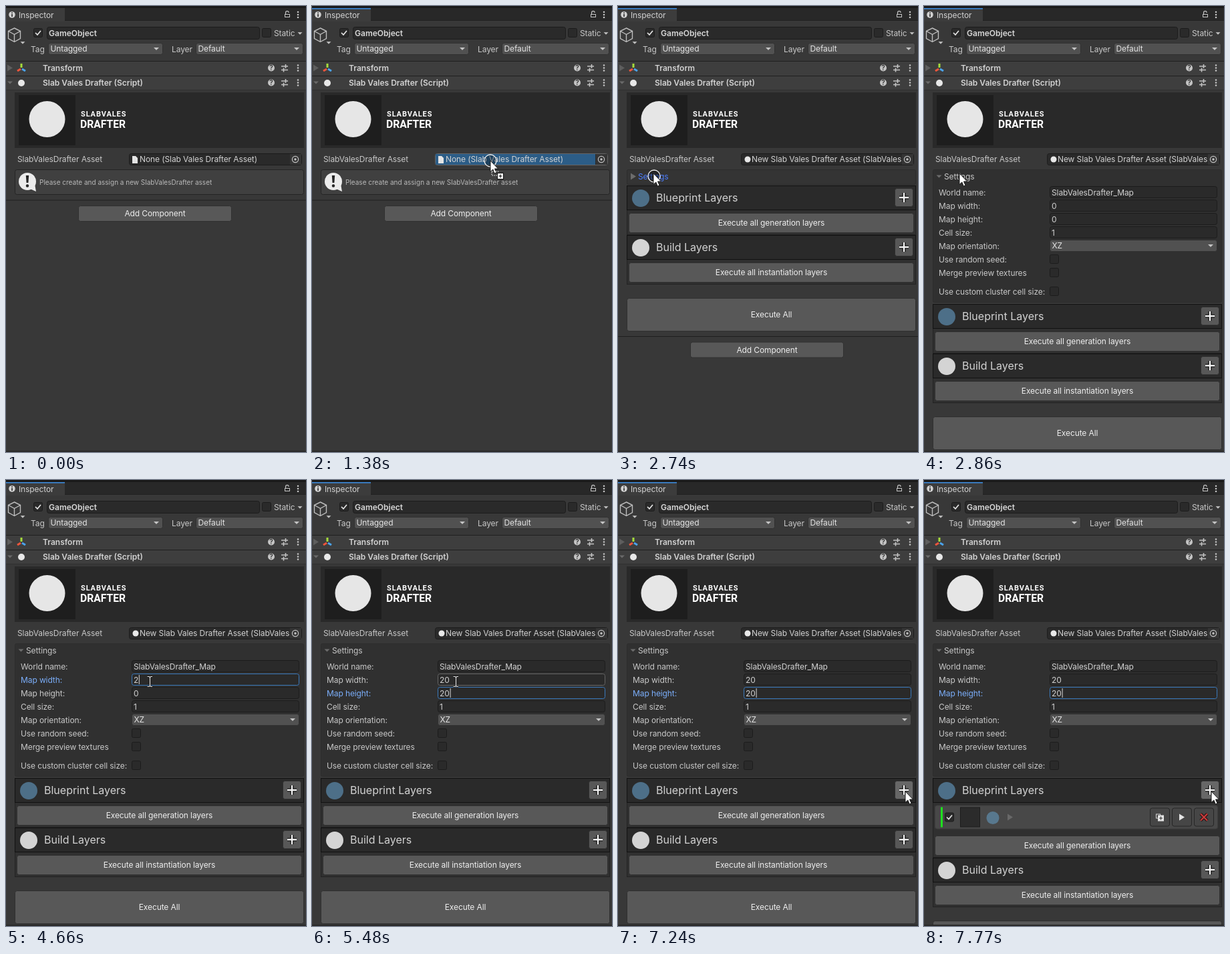
These frames come from a looping animation (449x666 px, 8 s). An HTML page:

```html
<!DOCTYPE html>
<html lang="en">
<head>
<meta charset="utf-8">
<title>Inspector</title>
<style>
html, body { margin: 0; width: 100%; height: 100%; overflow: hidden; background: #383838; }
svg { display: block; }
text { font: 12px Inter, "Open Sans", sans-serif; letter-spacing: -.1px; white-space: pre; }
.bold { font-weight: 600; letter-spacing: 0; }
.big { font-size: 16px; letter-spacing: 0; }
.small { font-size: 10px; letter-spacing: 0; }
.mid { text-anchor: middle; }
.mark1 { font: bold 11px Roboto, sans-serif; letter-spacing: .9px; }
.mark2 { font: bold 15.7px Roboto, sans-serif; letter-spacing: 0; }
</style>
</head>
<body>
<svg id="stage" width="449" height="666" viewBox="0 0 449 666"></svg>
<script>
const LOOP = 8000;
const stage = document.getElementById('stage');

// time, x, y, kind: arrow, drag (no drop), drop (plus badge), beam
const moves = [
  [960, 230, 207, 'drag'], [1110, 255, 226, 'drop'], [1240, 267, 231, 'drop'],
  [1930, 267, 231, 'arrow'], [2210, 162, 239, 'arrow'], [2350, 118, 246, 'arrow'],
  [2480, 72, 249, 'arrow'], [2590, 53, 250, 'arrow'], [3290, 93, 272, 'arrow'],
  [3440, 150, 296, 'arrow'], [3560, 196, 317, 'beam'], [3680, 212, 311, 'beam'],
  [3980, 215, 301, 'beam'], [6000, 226, 290, 'beam'], [6130, 240, 251, 'arrow'],
  [6250, 247, 279, 'beam'], [6400, 251, 385, 'arrow'], [6530, 254, 461, 'arrow'],
  [6680, 272, 478, 'arrow'], [6810, 299, 490, 'arrow'], [6960, 362, 499, 'arrow'],
  [7090, 422, 488, 'arrow'], [7240, 430, 465, 'arrow']
];
let mouse;

const path = (d, fill, stroke = 'none', w = 1) =>
  `<path d="${d}" fill="${fill}" stroke="${stroke}" stroke-width="${w}"/>`;
const box = (x, y, w, h, fill, stroke, r = 0) => stroke
  ? `<rect x="${x + .5}" y="${y + .5}" width="${w - 1}" height="${h - 1}" rx="${r}" fill="${fill}" stroke="${stroke}"/>`
  : `<rect x="${x}" y="${y}" width="${w}" height="${h}" rx="${r}" fill="${fill}"/>`;
const disc = (x, y, r, fill, stroke = 'none', w = 1) =>
  `<circle cx="${x}" cy="${y}" r="${r}" fill="${fill}" stroke="${stroke}" stroke-width="${w}"/>`;
const text = (x, y, s, cls = '', fill = '#c8c8c8') =>
  `<text x="${x}" y="${y}" class="${cls}" fill="${fill}">${s}</text>`;

const over = (x, y, w, h) => mouse && mouse[1] >= x && mouse[1] < x + w && mouse[2] >= y && mouse[2] < y + h;
const button = (x, y, w, h, label = '') =>
  box(x, y, w, h, over(x, y, w, h) ? '#676767' : '#585858', '#303030', 3) +
  text(x + w / 2, y + h / 2 + 4.4, label, 'mid', '#eee');
const field = (x, y, w, h, focus) =>
  box(x, y, w, h, '#2a2a2a', focus ? '#3a79bb' : over(x, y, w, h) ? '#656565' : '#1c1c1c', 3);
const check = (x, y, on) => box(x, y, 14, 14, '#2a2a2a', '#1c1c1c', 2) +
  (on ? path(`M${x + 3} ${y + 7}l3 3l5-6`, 'none', '#e4e4e4', 1.7) : '');
const right = (x, y, fill) => path(`M${x} ${y - 5}l8 5l-8 5z`, fill);
const down = (x, y, fill = '#c4c4c4', s = 4) => path(`M${x - s} ${y - s / 2}h${2 * s}l${-s} ${s}z`, fill);
const dropdown = (x, y, w, label) =>
  box(x, y, w, 18, '#515151', '#303030', 3) + text(x + 3.5, y + 13, label, '', '#e4e4e4') + down(x + w - 10, y + 9);
const dots = (x, y) => [-4, 0, 4].map(d => disc(x, y + d, 1.3, '#c4c4c4')).join('');

function component(y, name) {
  return box(0, y, 449, 22, '#3e3e3e') + box(0, y, 449, 1, '#202020') +
    text(55, y + 15, name, 'bold', '#d2d2d2') +
    disc(397, y + 10.5, 5, '#c4c4c4') + text(397, y + 14, '?', 'small bold mid', '#333') +
    path(`M412 ${y + 8}h10M412 ${y + 13.5}h10`, 'none', '#c4c4c4', 1.3) +
    path(`M418.5 ${y + 5}v6M415.5 ${y + 10.5}v6`, 'none', '#c4c4c4', 1.6) + dots(437, y + 10.5);
}

function header(active) {
  return box(0, 0, 449, 666, '#383838') + box(0, 0, 449, 22, '#282828') + box(0, 0, 449, 3, '#191919') +
    box(0, 3, 88, 20, '#3c3c3c') + (active ? box(0, 3, 88, 2, '#3a79bb') : '') + box(88, 21, 361, 1, '#202020') +
    disc(9, 13, 4.8, '#d2d2d2') + box(8.2, 12, 1.7, 4, '#333') + box(8.2, 9.5, 1.7, 1.6, '#333') +
    text(19, 17.5, 'Inspector', '', '#d2d2d2') +
    box(417, 12, 8, 5, 'none', '#c4c4c4') + path('M418.5 12V10a2.3 2.3 0 0 1 4.6 0', 'none', '#c4c4c4', 1.2) + dots(437, 13) +
    path('M12.5 33L21.5 37.500V48.500L12.5 53.500L3.500 48.500V37.500ZM3.500 37.500L12.5 42.500L21.500 37.500M12.500 42.500V53.500', 'none', '#bdbdbd', 1.4) +
    down(25, 55, '#c4c4c4', 3.5) + check(41, 33, true) + field(61, 31, 319, 19) +
    text(64, 45, 'GameObject', 'bold', '#d8d8d8') + check(383, 33) + text(401, 45, 'Static') + down(440, 41, '#c4c4c4', 3.5) +
    text(37, 69, 'Tag') + dropdown(63, 55, 172, 'Untagged') + text(248, 69, 'Layer') + dropdown(284, 55, 161, 'Default') +
    component(82, 'Transform') + right(2, 92.5, '#5e5e5e') +
    path('M23 92V86', 'none', '#a6dc3c', 3) + path('M22 94L17 97', 'none', '#f0563c', 3) + path('M24 94L29 97', 'none', '#4ba4ee', 3) +
    component(104, 'Slab Vales Drafter (Script)') + box(0, 125, 449, 1, '#303030') + down(6, 114.5, '#6a6a6a') + disc(23, 115, 5, '#e8e8e8') +
    box(13, 129, 433, 83, '#292929') + box(19, 133, 85, 75, '#1e1e1e') + disc(61.5, 169, 27, '#e6e6e6') +
    text(112, 164.5, 'SLABVALES', 'mark1', '#fff') + text(111, 181.5, 'DRAFTER', 'mark2', '#fff') +
    text(17, 233, 'SlabValesDrafter Asset');
}

function assetField(t) {
  const dropping = t >= 1110 && t < 1780, set = t >= 1780;
  return field(184, 220, 259, 18) + (dropping ? box(185, 221, 239, 16, '#2c5d87') : '') +
    box(425, 221, 17, 16, '#353535') + disc(433, 229, 4.6, 'none', '#c4c4c4', 1.2) + disc(433, 229, 1.7, '#c4c4c4') +
    (set ? disc(194, 229, 4.5, '#e8e8e8') : path('M189 224h5l3 3v8h-8z', '#e4e4e4')) +
    `<clipPath id="clip"><path d="M185 220H424V238H185z"/></clipPath><g clip-path="url(#clip)">` +
    text(200, 233, set ? 'New Slab Vales Drafter Asset (SlabValesDrafterAsset)' : 'None (Slab Vales Drafter Asset)', '', '#d2d2d2') + '</g>';
}

const addComponent = y => box(0, y, 449, 1, '#1e1e1e') + button(108, y + 8.5, 230, 24, 'Add Component');

const notice = () => box(13, 244, 433, 38, '#404040', '#242424', 3) +
  disc(32, 262, 13, '#ececec') + path('M36 273L45 277L43 266z', '#ececec') +
  path('M29.800 253h4.400l-.8 11h-2.800z', '#262626') + disc(32, 268.5, 2.2, '#262626') +
  text(50, 267, 'Please create and assign a new SlabValesDrafter asset', 'small', '#b8b8b8');

// Typed number: a selected zero, then the digits with a caret
function numberField(y, label, t, from, first, second, until) {
  const focus = t >= from && t < until;
  const value = t < first ? '0' : t < second ? '2' : '20';
  return text(22, y + 14, label, '', focus ? '#7baefa' : undefined) + field(188, y, 251, 18, focus) +
    (focus && value === '0' ? box(191, y + 2, 9, 14, '#376bad') : '') +
    text(191, y + 14, value, '', '#d2d2d2') +
    (focus && value !== '0' ? box(191 + 7.8 * value.length, y + 2, 1, 14, '#d8d8d8') : '');
}

function settings(t) {
  const open = t >= 2860, pressed = t >= 2740 && !open;
  let s = box(13, 244, 433, open ? 199 : 23, open ? '#303030' : '#343434', '#2c2c2c', 2) +
    (open ? down(22.500, 254.500, '#6c6c6c') : right(19, 254.500, '#6c6c6c')) +
    text(30, 259, 'Settings', '', pressed ? '#4c7eff' : undefined);
  if (!open) return s;
  s += text(22, 283, 'World name:') + field(188, 269, 251, 18) + text(191, 283, 'SlabValesDrafter_Map', '', '#d2d2d2') +
    numberField(289, 'Map width:', t, 3830, 4660, 4790, 4930) +
    numberField(309, 'Map height:', t, 4930, 5330, 5480, LOOP) +
    text(22, 343, 'Cell size:') + field(188, 329, 251, 18) + text(191, 343, '1', '', '#d2d2d2') +
    text(22, 363, 'Map orientation:') + dropdown(188, 349, 251, 'XZ');
  [['Use random seed:', 383], ['Merge preview textures', 403], ['Use custom cluster cell size:', 431]]
    .forEach(([label, y]) => s += text(22, y, label) + check(188, y - 12));
  return s;
}

function layerRow(y) {
  const tool = x => box(x, y + 4, 30, 28, '#464646', '#262626', 3);
  return box(16, y, 424, 36, '#484848', '#3c3c3c', 3) + box(25, y + 3, 3, 30, '#1fe01f') + check(31, y + 11, true) +
    box(54, y + 3, 30, 30, '#2b2b2b', '#1c1c1c') + disc(103, y + 19, 9.5, '#58788e') + right(125, y + 18, '#686868') +
    tool(338) + box(347, y + 13, 7, 7, 'none', '#d8d8d8') + box(350, y + 15, 9, 9, '#e4e4e4') + path(`M354.500 ${y + 17}v5M352 ${y + 19.500}h5`, 'none', '#333') +
    tool(371) + right(382, y + 18, '#e4e4e4') +
    tool(404) + path(`M414 ${y + 13}l10 10m0-10l-10 10`, 'none', '#2a1010', 4.500) + path(`M414 ${y + 13}l10 10m0-10l-10 10`, 'none', '#c83c3c', 2.200);
}

function section(y, title, label, icon, extra) {
  const plus = `M428 ${y + 11}v14M421 ${y + 18}h14`;
  return box(13, y, 433, 74 + extra, '#303030', '#232323') + box(13, y, 433, 37, '#2a2a2a', '#121212') +
    disc(34, y + 19, 13, icon) + text(57, y + 24, title, 'big', '#d2d2d2') +
    button(414, y + 4, 28, 28) + path(plus, 'none', '#111', 5) + path(plus, 'none', '#f2f2f2', 2.4) +
    (extra ? layerRow(y + 40.500) : '') + button(16, y + 41 + extra, 427, 30, label);
}

function layers(t) {
  const y = t >= 2860 ? 445 : 268, extra = t >= 7770 ? 45 : 0, end = y + extra;
  return section(y, 'Blueprint Layers', 'Execute all generation layers', '#4d6f88', extra) +
    section(end + 74, 'Build Layers', 'Execute all instantiation layers', '#d4d4d4', 0) +
    button(13, end + 168, 433, 50, 'Execute All') + addComponent(end + 225);
}

function pointer(t) {
  if (!mouse) return '';
  const [, x, y, kind] = mouse;
  let s = '';
  if (t >= 1380 && t < 1780) s += disc(267, 231, 9, 'rgba(0,0,0,.3)', '#f0f0f0', 1.3);
  if (t >= 2740 && t < 2860) s += disc(54, 254, 9, 'rgba(0,0,0,.3)', '#f0f0f0', 1.3);
  s += `<g transform="translate(${x} ${y})">`;
  if (kind === 'beam') {
    const beam = 'M-3.500 -7.500H-1L.5 -6.500L2 -7.500H4M.5 -6.500V6.500M-3.500 7.500H-1L.5 6.500L2 7.500H4';
    s += path(beam, 'none', '#111', 2.6) + path(beam, 'none', '#e8e8e8', 1.2);
  } else {
    s += path('M0 0V16.500L3.800 13L6.300 19L9 17.800L6.500 12H11.500Z', '#fff', '#111', .9);
    if (kind !== 'arrow')
      s += '<rect x="2" y="16" width="10" height="6" fill="none" stroke="#fff" stroke-dasharray="1.500 1.500"/>';
    if (kind === 'drop')
      s += box(10, 18, 10, 10, '#fff', '#111') + path('M15 20.500v5M12.500 23h5', 'none', '#111', 1.2);
  }
  return s + '</g>';
}

function scene(t) {
  mouse = moves.filter(m => m[0] <= t).pop();
  return header(t >= 960) + assetField(t) +
    (t < 1780 ? notice() + addComponent(289.500) : settings(t) + layers(t)) +
    box(0, 664, 449, 2, '#292929') + pointer(t);
}

let start, shown;
function tick(now) {
  start ??= now;
  const picture = scene((now - start) % LOOP);
  if (picture !== shown) stage.innerHTML = shown = picture;
  requestAnimationFrame(tick);
}
requestAnimationFrame(tick);
</script>
</body>
</html>
```
